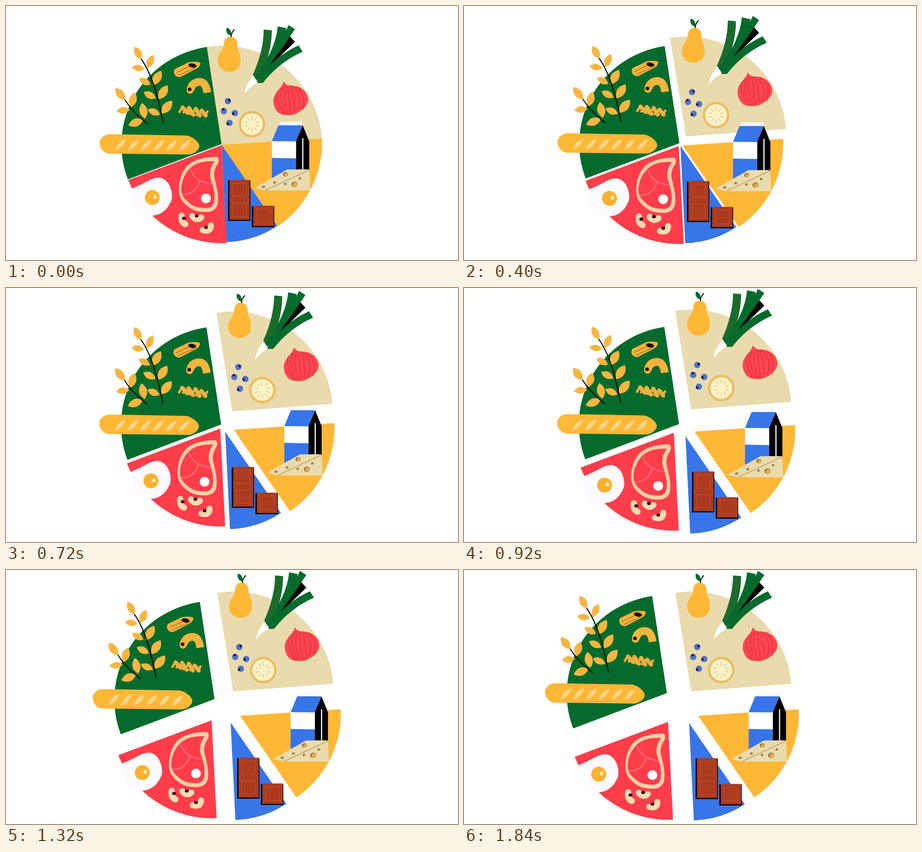
Recreate the animation shown at these times as an HTML page. Size 998x561 px, loop 2.08 s.

```html
<!DOCTYPE html>
<html lang="en">
<head>
<meta charset="utf-8">
<title>Food wheel</title>
<style>
html, body { margin: 0; width: 100%; height: 100%; overflow: hidden; background: #fff; }
svg { display: block; width: 100%; height: 100%; }
</style>
</head>
<body>
<svg id="stage" viewBox="0 0 998 561"></svg>
<script>
const LOOP = 2080, STEP = 40;

// SVG helpers
const fill = (d, color) => `<path d="${d}" fill="${color}"/>`;
const line = (d, color, width, cap = 'round') =>
  `<path d="${d}" fill="none" stroke="${color}" stroke-width="${width}" stroke-linecap="${cap}" stroke-linejoin="round"/>`;
const oval = (x, y, rx, color, ry = rx, turn = 0) =>
  `<ellipse cx="${x}" cy="${y}" rx="${rx}" ry="${ry}" fill="${color}" transform="rotate(${turn} ${x} ${y})"/>`;
const rect = (x, y, w, h, color) =>
  `<rect x="${x}" y="${y}" width="${w}" height="${h}" fill="${color}"/>`;
const many = (list, draw) => list.map(draw).join('');

// Pointed leaf between two ends
function leaf([x, y, u, v], color, bulge = .5) {
  const mx = (x + u) / 2, my = (y + v) / 2, px = (y - v) * bulge, py = (u - x) * bulge;
  return fill(`M${x} ${y}Q${mx + px} ${my + py} ${u} ${v}Q${mx - px} ${my - py} ${x} ${y}Z`, color);
}

function leek() {
  return fill('M546 153L556 169Q536 180 526 195Q530 172 546 153Z', '#fbfdff')
    + fill('M569 52L587 53.5Q587 85 577 117L556 168L545 152Q569 98 569 52Z', '#1b6b2d')
    + fill('M627 67L638 79Q606 110 575 140L580 120Z', '#000')
    + fill('M646 87L655 101Q603 124 567 170L554 170L570 145Q600 108 646 87Z', '#046b2d')
    + fill('M600 45L619 49L618 55L624 42L638 51Q612 91 590 119L562 163L549 160Q596 95 600 45Z', '#046b2d');
}

function onion() {
  const ribs = [[594, 206], [604, 216], [614, 224], [626, 231], [639, 235], [653, 231]];
  return fill('M613 166C617 174 623 176 633 176C652 177 667 190 667 207C667 222 650 233 640 238C630 243 610 242 602 236C592 228 589 213 591 204C594 190 609 182 613 166Z', '#fc4552')
    + many(ribs, ([x, y], i) => line(`M${610 + i * 4} ${181 - i}C${x - 2} 190 ${x} ${y - 8} ${612 + i * 6} ${239 - i * i * .35}`, '#e5303f', 1.8))
    + line('M641 178C656 188 661 206 655 229', '#e5303f', 1.8);
}

function bananaSlice() {
  let rays = '';
  for (let i = 0; i < 10; i++) {
    const a = i * Math.PI / 5 + .3, c = Math.cos(a), s = Math.sin(a);
    rays += `M${543 + 10 * c} ${261 + 10 * s}L${543 + 17 * c} ${261 + 17 * s}`;
  }
  return oval(543, 261, 29.5, '#ecbd62') + oval(543, 261, 24, '#fdf3c8') + line(rays, '#e2cd8e', 2);
}

function produce() {
  const berries = [[490, 210, 3, -2], [481, 232, -1, -4], [505.5, 236.5, -4, 1], [493.5, 258, -4, 2]];
  return fill('M476.5 308L441.5 90.5A221 221 0 0 1 697.5 291.5Z', '#eadbae')
    + fill('M495 68C505 68 511 75 510.5 84C510 97 518 103 518 120C518 136 507 145.5 493 145.5C478 145.5 467.5 135 467.5 120C468 104 481 97 481 84C481 75 486 68 495 68Z', '#ffb736')
    + line('M497 68Q497 59 504 52.5', '#000', 2.2)
    + fill('M487 48C495 49 499 57 496.5 66C487 62 485 55 487 48Z', '#046b2d')
    + leek() + onion() + bananaSlice()
    + many(berries, ([x, y, dx, dy]) => oval(x, y, 7, '#5272c8') + oval(x + dx, y + dy, 2.6, '#12142a'));
}

function dairy() {
  const holes = [[617.5, 372, 5.5, 4.5], [593.5, 390, 3.2, 2.6], [649.5, 381, 2.8, 2.6],
    [617, 393, 2.8, 2.6], [569, 399.5, 3.6, 2.5], [637, 394, 6.6, 5.8]];
  return fill('M475.5 306.5L697.5 292A221 221 0 0 1 599.5 486.5Z', '#ffb736')
    + fill('M605 256L653 255.5L655 264H602Z', '#f4f9ff')
    + rect(587, 298, 54, 39, '#fff')
    + fill('M601.5 263.5H654.5L641 299L587 298.5Z', '#3775e8')
    + fill('M587 335.5L641 336.5V380H587Z', '#3775e8')
    + fill('M655 263.5L669.5 299V361H640.5V298.5Z', '#000')
    + line('M655.3 292V361', '#fff', 2.5, 'butt')
    + fill('M548.5 402L621 361H669.5L671.5 407.5H573Z', '#eadbae')
    + line('M574 406.5L669.5 362', '#b99a62', 1.8)
    + many(holes, ([x, y, rx, ry]) => oval(x, y, rx, '#5f4a2a', ry) + oval(x + .8, y + .5, rx - .9, '#e3ac4a', ry - .7));
}

function chocolateCell(x, y, w, h) {
  const m = 7.5, r = x + w, b = y + h;
  return line(`M${x + m} ${y + m}H${r - m}V${b - m}H${x + m}ZL${x} ${y}M${r} ${y}l${-m} ${m}M${x} ${b}l${m} ${-m}M${r} ${b}l${-m} ${-m}`, '#d2603d', .7);
}

function sweets() {
  return fill('M476 306.5L599 486A221 221 0 0 1 486.5 521.5Z', '#3775e8')
    + rect(490.5, 385, 49, 89.5, '#000') + rect(493.5, 384, 44.5, 88, '#ac3a1f')
    + chocolateCell(493.5, 384, 44.5, 44) + chocolateCell(493.5, 428, 44.5, 44)
    + rect(542.8, 442, 49.5, 46.5, '#000') + rect(545.8, 441, 45.2, 45, '#ac3a1f')
    + chocolateCell(545.8, 441, 45.2, 45);
}

function protein() {
  const beans = [['M388 463Q386 478 396 482', 393, 469], ['M411.5 464Q421 476 431 467', 421, 463.5],
    ['M434.5 495Q452 500 452.5 484.5', 441.5, 489]];
  return fill('M476 307.5L487 523.5A221 218 0 0 1 270 384.5Z', '#ff3d4b')
    + fill('M276 404Q292 398 318 384C338 374 350 380 358 391C366 403 370 424 363 434C353 455 338 462 322 463C305 464 285 455 279 440C274 428 277 415 276 404Z', '#fdfbff')
    + oval(323, 423, 16.5, '#fcb12f') + oval(329.5, 421.5, 4.2, '#fff0b5')
    + fill('M464 333C470 333 471 342 468 348C462 356 458 368 460 378C464 395 470 415 468 433C467 448 456 456 440 455C425 455 412 452 401 442C388 432 381 420 382 404C382 385 388 365 402 351C420 337 440 334 464 333Z', '#fbd0a6')
    + fill('M461 343C452 352 448 370 452 382C456 395 464 415 459 434C456 445 448 447 438 446C422 446 408 440 402 432C392 425 386 415 387 402C388 385 396 368 408 357C422 345 440 342 461 343Z', '#ff3d4b')
    + line('M408 362Q418 389 452 393M390 416.5Q420 415 427 388', '#ff6975', 3)
    + oval(441.5, 425, 10.7, '#fff')
    + many(beans, ([d, x, y]) => line(d, '#fadab0', 13.5) + oval(x, y, 4.2, '#2b0a08', 3.6));
}

function pasta() {
  return fill('M373 139L404 124C415 122.5 425 123 429 125C430 131 425 136 421 138L385 157C374 158 367 148 373 139Z', '#f5b23d')
    + line('M377 147L405 133.5M381 153L415 138', '#b0761f', 1.8)
    + oval(412, 131.5, 9, '#1f0a04', 4.6, 12)
    + line('M407 185Q411 168 428 167.5Q441 168 444.5 191.5', '#f3b43e', 17, 'butt')
    + oval(406.5, 186, 7.8, '#f3b43e') + oval(405.5, 184, 4, '#1f0a04')
    + line('M390 224L401 236M404 225L414 240M419 227L428 242M432 231L441 242', '#eeb040', 9)
    + line('M383 234L389 224M392 235L404 227M407 239L418 229M421 241L431 232M439 242L445 233', '#eeb040', 5);
}

function grains() {
  const ears = [[299, 118, 284, 90], [306, 139, 278, 135], [312, 137, 325, 108], [319, 174, 294, 160],
    [324, 175, 343, 143], [331, 204, 304, 190], [337, 206, 357, 175], [340, 240, 313, 228], [343, 238, 367, 209],
    [263, 208, 242, 181], [273, 229, 244, 232], [275, 224, 285, 191], [307, 249, 300, 214], [303, 251, 270, 264]];
  let cuts = '';
  for (let i = 0; i < 6; i++) cuts += leaf([241 + i * 28.2, 319 + i * .4, 265 + i * 28.2, 294 + i * .4], '#fcd68b', .27);
  return fill('M476 305L269 383A221 218 0 0 1 443.5 90.5Z', '#046b2d')
    + many(ears, e => leaf(e, '#f8b542'))
    + line('M299 118Q328 158 347 258M263 208Q280 235 312 260', '#000', 2.2)
    + pasta()
    + fill('M230 283L398 286C410 287 427 300 427 309C427 318 414 328 403 328L230 326C216 326 207 314 207 302C207 292 218 283 230 283Z', '#ffb736')
    + cuts;
}

// Each slice: its drawing and its shifts as [ms, x, y]
const slices = [
  [produce, [[0, 0, 0], [400, 13.5, -20], [560, 20.5, -31.5], [720, 23, -35.5], [920, 25, -40]]],
  [dairy, [[0, 0, 0], [400, 7, 1.5], [720, 27.5, 6.5], [920, 33.5, 10.5], [1120, 38.5, 14], [1320, 41.5, 15.5]]],
  [sweets, [[0, 0, 0], [400, 2, 2.5], [720, 8, 11], [920, 13, 21], [1120, 18, 28], [1320, 20, 30.5], [1640, 21, 31.5]]],
  [protein, [[0, 0, 0], [400, -1.7, 1.8], [720, -3, 3], [920, -12.7, 12.3], [1320, -22, 24.5], [1640, -25.5, 28]]],
  [grains, [[0, 0, 0], [400, -.4, -2], [720, -.9, -3.6], [920, -1.2, -4.6], [1120, -7, -10.5],
    [1320, -15.5, -20], [1640, -25, -29], [1840, -28, -33]]],
];

// Monotone cubic through the keys, at rest at both ends
function shift(keys, t, axis) {
  const last = keys.length - 1;
  if (t >= keys[last][0]) return keys[last][axis];
  const rate = i => (keys[i + 1][axis] - keys[i][axis]) / (keys[i + 1][0] - keys[i][0]);
  const slope = i => {
    if (i === 0 || i === last) return 0;
    const a = rate(i - 1), b = rate(i);
    return a * b > 0 ? 2 * a * b / (a + b) : 0;
  };
  let i = 0;
  while (t >= keys[i + 1][0]) i++;
  const span = keys[i + 1][0] - keys[i][0], u = (t - keys[i][0]) / span, v = 1 - u;
  return keys[i][axis] * v * v * (1 + 2 * u) + keys[i + 1][axis] * u * u * (3 - 2 * u)
    + span * u * v * (v * slope(i) - u * slope(i + 1));
}

const stage = document.getElementById('stage');
stage.innerHTML = many(slices, ([draw]) => `<g>${draw()}</g>`);
const start = performance.now();

function tick() {
  const t = Math.floor((performance.now() - start) % LOOP / STEP) * STEP;
  slices.forEach(([, keys], i) =>
    stage.children[i].setAttribute('transform', `translate(${shift(keys, t, 1)} ${shift(keys, t, 2)})`));
  requestAnimationFrame(tick);
}
tick();
</script>
</body>
</html>
```
